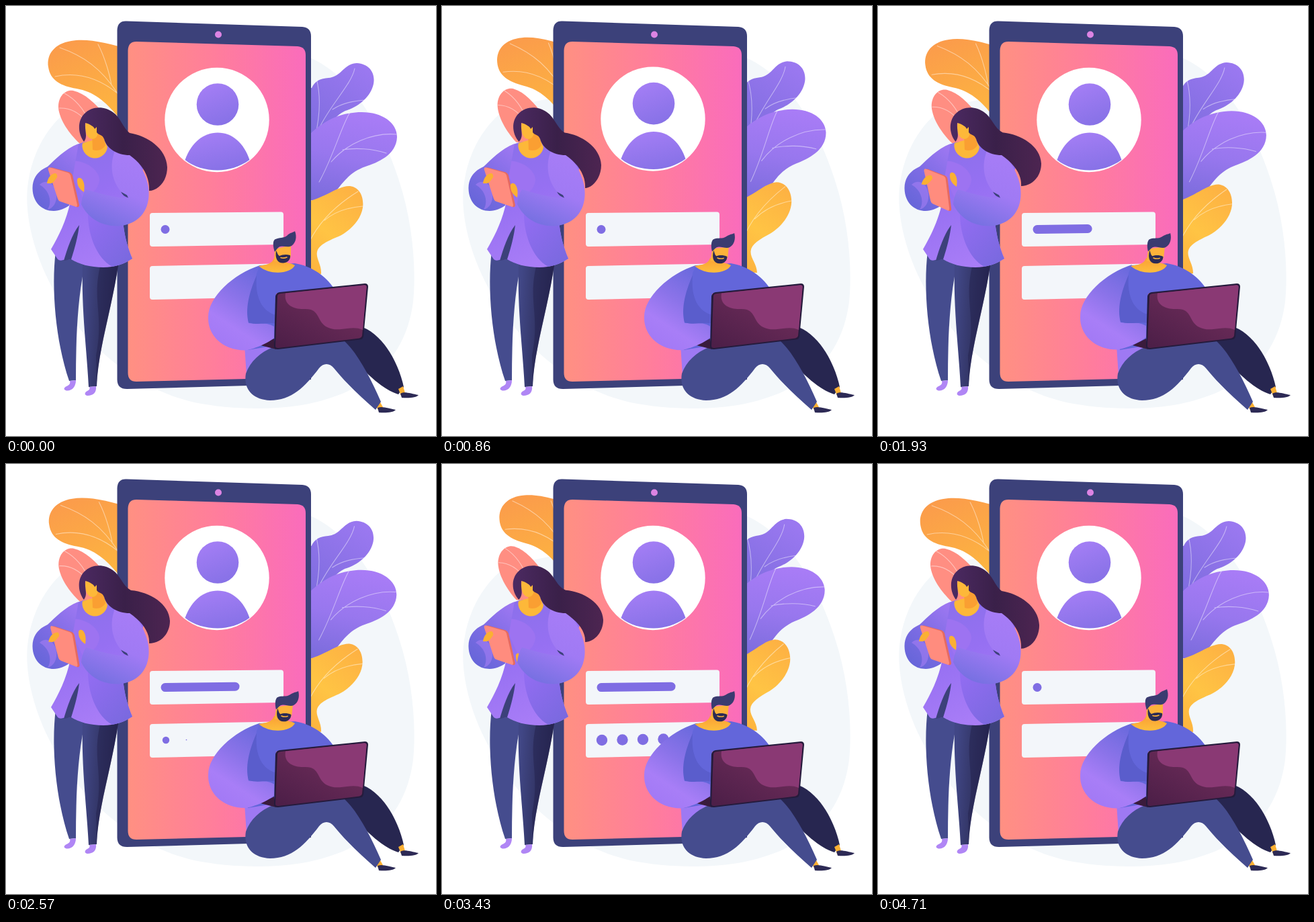
Animation of 640x640 px, one loop 4.78 s. Source, as an HTML page:

```html
<!DOCTYPE html>
<html lang="en">
<head>
<meta charset="utf-8">
<title>Sign in</title>
<style>
  html, body { margin: 0; width: 100%; height: 100%; overflow: hidden; background: #fff; }
  svg { display: block; width: 100%; height: 100%; }
  .vein { fill: none; stroke: #fff; stroke-opacity: .45; stroke-width: 1.1; stroke-linecap: round; }
</style>
</head>
<body>
<svg viewBox="0 0 640 640">
  <defs>
    <linearGradient id="screen"><stop stop-color="#ff9082"/><stop offset=".5" stop-color="#ff7d9c"/><stop offset="1" stop-color="#fa6cbc"/></linearGradient>
    <linearGradient id="orange" x1=".3" y1="0" x2=".7" y2="1"><stop stop-color="#fb9c4b"/><stop offset="1" stop-color="#fdb93e"/></linearGradient>
    <linearGradient id="yellow" x1=".9" y1="0" x2=".3" y2="1"><stop stop-color="#fdb043"/><stop offset=".6" stop-color="#ffc444"/><stop offset="1" stop-color="#fdb53f"/></linearGradient>
    <linearGradient id="leaf" x1=".75" y1="0" x2=".15" y2="1"><stop stop-color="#9a78f0"/><stop offset="1" stop-color="#7a6bdc"/></linearGradient>
    <linearGradient id="leafBig" x1=".6" y1="0" x2=".35" y2="1"><stop stop-color="#a87cf6"/><stop offset=".5" stop-color="#9877ee"/><stop offset="1" stop-color="#7b6cdc"/></linearGradient>
    <linearGradient id="avatar" x1=".3" y1="0" x2=".7" y2="1"><stop stop-color="#a47ef5"/><stop offset="1" stop-color="#8671e6"/></linearGradient>
    <linearGradient id="jacket" x1=".2" y1="0" x2=".5" y2="1"><stop stop-color="#8a70ea"/><stop offset=".45" stop-color="#9670f2"/><stop offset="1" stop-color="#a97df7"/></linearGradient>
    <linearGradient id="panel" x1="0" y1="0" x2=".8" y2="1"><stop stop-color="#956df4"/><stop offset="1" stop-color="#7a69df"/></linearGradient>
    <linearGradient id="cuff" x1=".8" y1="0" x2=".2" y2="1"><stop stop-color="#9c77f1"/><stop offset=".5" stop-color="#7d6ce4"/><stop offset="1" stop-color="#6565d8"/></linearGradient>
    <linearGradient id="sleeve" x1=".7" y1="0" x2=".35" y2="1"><stop stop-color="#a87df7"/><stop offset=".55" stop-color="#a07af4"/><stop offset="1" stop-color="#7670e1"/></linearGradient>
    <linearGradient id="hair"><stop stop-color="#4c2a62"/><stop offset=".5" stop-color="#3a2049"/><stop offset="1" stop-color="#4d2551"/></linearGradient>
    <linearGradient id="trouser" x1=".1" y1="0" x2="1" y2=".2"><stop stop-color="#414786"/><stop offset=".5" stop-color="#343769"/><stop offset="1" stop-color="#25244f"/></linearGradient>
    <linearGradient id="arm" x1=".8" y1="0" x2=".3" y2="1"><stop stop-color="#6568db"/><stop offset=".45" stop-color="#8b73e9"/><stop offset=".75" stop-color="#a87ef7"/><stop offset="1" stop-color="#a279f5"/></linearGradient>
    <linearGradient id="lid" x1=".9" y1="0" x2=".1" y2="1"><stop stop-color="#77305f"/><stop offset="1" stop-color="#4d1f48"/></linearGradient>
    <linearGradient id="skin" x1="0" y1="0" x2="0" y2="1"><stop stop-color="#fa9f35"/><stop offset="1" stop-color="#fdbe3c"/></linearGradient>
  </defs>

  <path fill="#f3f7fa" d="M455 78C520 108 563 190 585 260C605 320 611 390 606 440C596 520 545 575 440 594C390 602 330 600 280 590C200 572 120 510 75 430C40 370 28 310 32 270C38 215 66 172 100 150Z"/>

  <g id="pinkLeaf">
    <path fill="#ff8e82" d="M110 205C94 190 80 170 78 152C77 135 88 124 100 126C118 130 132 145 146 160L142 205Z"/>
    <path class="vein" d="M87 130C102 138 115 152 124 172M79 152C97 151 110 160 120 172"/>
  </g>
  <g id="orangeLeaf">
    <path fill="url(#orange)" d="M190 67C150 54 120 48 97 52C72 56 60 72 63 91C66 111 82 119 105 123C130 127 148 142 166 164L190 184Z"/>
    <path class="vein" d="M80 62C115 74 142 93 166 130M73 105C105 98 135 105 166 130M137 57C148 78 155 105 157 118"/>
  </g>
  <g id="smallLeaf">
    <path fill="url(#leaf)" d="M455 122C460 111 468 108 480 107C500 105 502 86 522 85C541 86 550 100 547 116C543 135 525 150 505 156C490 162 470 190 440 215L440 122Z"/>
    <path class="vein" d="M519 93C514 117 484 145 466 182M536 140C514 141 498 146 486 154M462 108C469 135 467 165 460 195"/>
  </g>
  <g id="bigLeaf">
    <path fill="url(#leafBig)" d="M430 215C455 185 480 162 520 158.500C556 155 582 172 582 195C581 222 553 233 535 239C512 247 502 262 490 277C480 288 455 290 430 291Z"/>
    <path class="vein" d="M581 191C545 188 507 205 484 232M511 160C498 182 488 222 466 262M566 219C545 212 520 211 501 214"/>
  </g>
  <g id="yellowLeaf">
    <path fill="url(#yellow)" d="M440 294C480 284 492 268 512 268C527 270 533 285 531 300C528 320 510 336 495 343C478 350 465 356 463 366C461 376 470 385 469 399L440 395Z"/>
    <path class="vein" d="M524 276C490 297 466 322 452 350M531 298C505 300 486 309 474 319"/>
  </g>

  <path fill="#3c417a" d="M179 22.500L441 31Q454 32 454 45L454 556L360 565L180 570Q165.500 570 165.500 556L165.500 36Q166 22 179 22.500Z"/>
  <path fill="url(#screen)" d="M194 53L434 60Q446 61 446 73L446 545L358 555L194 559Q181.500 559 181.500 546L181.500 66Q182 53 194 53Z"/>
  <circle cx="316" cy="42.500" r="5" fill="#dc84e3"/>
  <g id="avatarBox">
    <circle cx="314" cy="169.500" r="77.700" fill="#fff"/>
    <circle cx="315" cy="146.500" r="31.300" fill="url(#avatar)"/>
    <path fill="url(#avatar)" d="M266.500 229C276 203 294 188.500 315 188.500C337 188.500 354 204 362.500 229C348 239.500 331 244.500 315 244.500C297 244.500 279 239.500 266.500 229Z"/>
  </g>
  <g fill="#f3f6fa">
    <path d="M218 308L409 306.500Q413 306.500 413 310.500L413 351Q413 355 409 355L218 358Q214 358 214 354L214 312Q214 308 218 308Z"/>
    <path d="M218 387L400 383.500L400 433L218 437Q214 437 214 433L214 391Q214 387 218 387Z"/>
  </g>
  <path id="bar" fill="none" stroke="#7f6de3" stroke-width="13" stroke-linecap="round"/>
  <g id="dots" fill="#7f6de3"></g>

  <!-- standing woman -->
  <path fill="#454c8e" d="M74 365C67 420 74 500 94 558L104 557C104 500 106 440 116 392L120 365Z"/>
  <path fill="url(#trouser)" d="M114 385C112 450 120 510 123 567L135 566C137 510 158 450 168 380Z"/>
  <path fill="#25244f" opacity=".55" d="M140 388C128 440 146 460 134 520L135 560C138 510 158 450 167 384Z"/>
  <g fill="#b086f5">
    <path d="M95 558L104 557C104 566 99 573 90 572.500C85 571 86 568 90 566C95 564 96 561 95 558Z"/>
    <path d="M124 567L134 566C135 575 130 580 121 580C116 579 117 575 121 573C125 571 125 569 124 567Z"/>
  </g>
  <path fill="url(#jacket)" d="M115 203C100 207 88 217 78 226L96 290C90 320 78 343 67 362L77 377Q80 380 85 378L97 377C108 384 125 389 145 389C162 389 176 384 188 376C180 357 176 340 174 320L205 240C192 218 172 205 148 199Z"/>
  <path fill="url(#panel)" d="M122 300C120 340 135 375 158 388C170 386 180 381 188 376C180 357 176 340 174 320L150 300Z"/>
  <path fill="#3c417a" d="M109 326C98 340 91 362 86 379L97 377C103 358 107 343 109 326Z"/>
  <path fill="#9d73f1" d="M92 231C118 227 140 245 139 260C137 274 125 282 115 288L100 255Z"/>
  <path fill="url(#cuff)" d="M108 205C87 213 73 229 62 239C46 246 39 258 39.500 272C40 292 53 305 71 305C80 305 88 301 94 297L100 250Z"/>
  <path fill="#aa80f6" opacity=".55" d="M50 266C60 256 74 265 75 280C76 293 70 301 62 303C70 290 63 273 50 266Z"/>
  <g id="tablet">
    <path fill="#e56a62" d="M67 240L95 247.500Q98 249 99 252L109 296Q109 300 105 299L69 250Z"/>
    <path fill="#ff8c7e" d="M66 240.500L92 248Q95 249 96 252L106 296Q106 300 103 298.500L81 291Q78 290 77 287L63 244Q62 239 66 240.500Z"/>
    <path fill="#fbb033" d="M61 264C62 255 68 249 74 249Q77 251 76 255C73 259 71 263 67 264Z"/>
  </g>
  <path id="hand" fill="#fbb033" d="M106 261C105 255 111 254 114 259C117 264 117 270 116 277L112 274C108 270 106 266 106 261Z"/>
  <path fill="url(#sleeve)" d="M164 205C190 215 208 245 212 270C216 301 200 325 167 327.500C140 328 121 314 112 295Q113 282 119 273C140 279 160 285 182 286C165 275 152 250 160 222Z"/>
  <path fill="#3c417a" d="M171 276.500L180 281.500L182 285.500C177 284 173 281 171 276.500Z"/>
  <path fill="#fdb839" d="M114 204C111 215 121 226 131 226.500C142 227 150 219 151 210L146 199L128 200Z"/>
  <path fill="#fa9f32" d="M128 190L129 214C137 217 145 213 148 207L143 184Z"/>
  <path fill="#fdb839" d="M119 173C116 185 120 198 129 198C137 197 138 188 136 180L126 172Z"/>
  <path id="hairLock" fill="url(#hair)"/>

  <!-- sitting man -->
  <path fill="#272650" d="M525 476C560 486 584 530 592 567L584 578C560 570 535 548 500 505L500 480Z"/>
  <path fill="#fbb033" d="M584 570L591 566L594 576L588 580ZM549 593L556 588L561 597L554 601Z"/>
  <path fill="#2d2a55" d="M587 577C592 573 603 577 614 579C611 583 599 584 589 583ZM553 598C560 595 570 599 580 601C577 605 565 606 555 605Z"/>
  <path fill="#9e79f3" d="M355 505L358 550L400 515L395 490Z"/>
  <path fill="#6366da" d="M378 386C362 395 355 420 352 450L360 512L402 505L402 428L488 420C476 402 455 387 430 383Z"/>
  <path fill="#454c8e" d="M357 547C364 528 380 514 400 507L498 494C520 510 542 552 558 589L550 601C528 582 505 560 488 539C482 531 472 531 466 539C445 567 425 587 393 587C367 586 353 570 357 547Z"/>
  <path fill="#3a1b3c" d="M379 505L399 495L402 511Z"/>
  <g id="forearm">
    <path fill="url(#arm)" d="M378 386C338 399 301 433 301 463C300 492 325 513 357 512.500C370 510 388 503 399 494L399 477C388 470 374 473 361 472C356 445 372 420 373 398Z"/>
    <path fill="#5a5dcc" d="M373 401C361 428 356 452 361 471C375 476 390 470 402 473L402 460C382 455 370 435 373 401Z"/>
  </g>
  <path fill="url(#skin)" d="M376 387C388 385 396 384 399 375L414 380C419 383 426 383 430 386C424 398 394 402 376 387Z"/>
  <g id="head">
    <path fill="#fdb23a" d="M400 362L424 356L424 372C422 380 416 382 410 381L399 380Z"/>
    <path fill="#2b2a55" d="M402 364C400 377 405 383 413 382.500C420 382 424 376 423 371C417 369 411 370 407 372C404 370 404 367 402 364Z"/>
    <path fill="none" stroke="#fdb23a" stroke-width="1.600" stroke-linecap="round" d="M409 374.500Q413 376 418 374"/>
    <path fill="#3a3b70" d="M400 366C397 358 397 350 400 347.500C407 344 413 346 418 342C423 337 428 337 430 335C433 343 432 352 425 357C420 360 411 356 406 359C403 361 402 364 400 366Z"/>
  </g>
  <path fill="#251b3c" d="M407 426L534 413Q539 413 539 418L532 492Q531 496 527 496.500L405 511Q399 511.500 399 507L401 432Q402 427 407 426Z"/>
  <path fill="url(#lid)" d="M409 428L533 415.500Q537 415 536.500 419L530 491Q529 494 526 494.500L405 509Q401 509 401 506L404 432Q404 428.500 409 428Z"/>
  <path fill="#8a3974" d="M416 427.500C413 445 428 452 446 451C468 451 462 470 478 478C495 487 513 474 531 482L536.500 419Q537 415 533 415.500Z"/>
</svg>

<script>
const LOOP = 4780;
const $ = id => document.getElementById(id);
const clamp = u => Math.max(0, Math.min(1, u));
const ease = u => u * u * (3 - 2 * u);
const ramp = (t, from, to) => clamp((t - from) / (to - from));

// [time, ...values] rows, eased between neighbours
function track(rows, t) {
  let i = 1;
  while (i < rows.length - 1 && t > rows[i][0]) i++;
  const [t0, ...a] = rows[i - 1], [t1, ...b] = rows[i];
  const u = ease(ramp(t, t0, t1));
  return a.map((v, k) => v + (b[k] - v) * u);
}

// id, swing in degrees, pivot
const leaves = [
  ['orangeLeaf', 5.2, 172, 345],
  ['pinkLeaf', 5.3, 140, 210],
  ['smallLeaf', -3.4, 462, 255],
  ['bigLeaf', -3.9, 450, 380],
  ['yellowLeaf', -7.4, 450, 398]
];
const lock = [[0, 0, 0], [860, -3, -4], [1930, 3, -7], [2570, 4, -8], [3430, 0, -10], [4140, 2, -7], [LOOP, 0, 0]];
const nod = [[0, 0], [600, 6], [3600, 6], [4140, 4], [4700, 0], [LOOP, 0]];
const tablet = [[0, 0, 0, 0], [1200, 0, 0, 0], [1930, 3, 4, 5.7], [2570, 2, 2, 3], [3200, 0, 0, 0], [LOOP, 0, 0, 0]];
const swipe = [[0, 0, 0], [860, -4, 8], [1300, 0, 4], [1930, 1, -8], [2570, 2, -9], [3430, 4, 26], [4140, 4, 26], [4650, 0, 0], [LOOP, 0, 0]];

const dots = [0, 1, 2, 3].map(i => {
  const c = document.createElementNS('http://www.w3.org/2000/svg', 'circle');
  c.setAttribute('cx', 238 + 30.5 * i);
  c.setAttribute('cy', 411 - .5 * i);
  return $('dots').appendChild(c);
});

const move = (id, value) => $(id).setAttribute('transform', value);

function hairPath(s, x, y) {
  return `M${116 + s / 2} 202C${107 + s} 190 ${106 + s} 172 ${116 + s} 161` +
    `C${128 + s} 148 ${147 + s} 149 ${159 + s} 158C${171 + s} 166 ${174 + s} 182 ${184 + x / 2} ${189 + y / 8}` +
    `C${210 + x} ${193 + y / 3} ${239 + x} ${212 + y / 2} ${240 + x} ${240 + y * .8}` +
    `C${240 + x} ${261 + y} ${226 + x} ${275 + y} 213 ${275 + y}C214 ${255 + y / 2} 204 236 184 222` +
    `C165 222 150 212 146 198C143 190 138 193 135 188L135 180L132 183C131 180 126 176 118 174` +
    `C117 187 122 194 ${116 + s / 2} 202Z`;
}

function draw(t) {
  const sway = (1 - Math.cos(4 * Math.PI * t / LOOP)) / 2;
  for (const [id, deg, x, y] of leaves) move(id, `rotate(${deg * sway} ${x} ${y})`);

  $('hairLock').setAttribute('d', hairPath(-3.6 * sway, ...track(lock, t)));
  move('head', `rotate(${track(nod, t)[0]} 405 385)`);
  const [tx, ty, turn] = track(tablet, t);
  move('tablet', `translate(${tx} ${ty}) rotate(${turn} 86 269)`);
  move('hand', `translate(${track(swipe, t)})`);
  move('forearm', `translate(0 ${-Math.sin(Math.PI * ramp(t, 600, 2900))})`);
  move('avatarBox', `translate(0 ${-1.4 * Math.sin(Math.PI * ramp(t, 600, 1150))})`);

  const clear = 1 - ease(ramp(t, 4200, 4520));
  const typed = ramp(t, 1100, 2250) * clear;
  $('bar').setAttribute('d', `M237 332.500L${237.01 + 104 * typed} ${332.5 - 1.3 * typed}`);
  dots.forEach((c, i) => c.setAttribute('r', 8.2 * ramp(t, 2380 + 160 * i, 2680 + 160 * i) * clear));
}

function tick() {
  draw(performance.now() % LOOP);
  requestAnimationFrame(tick);
}
tick();
</script>
</body>
</html>
```
